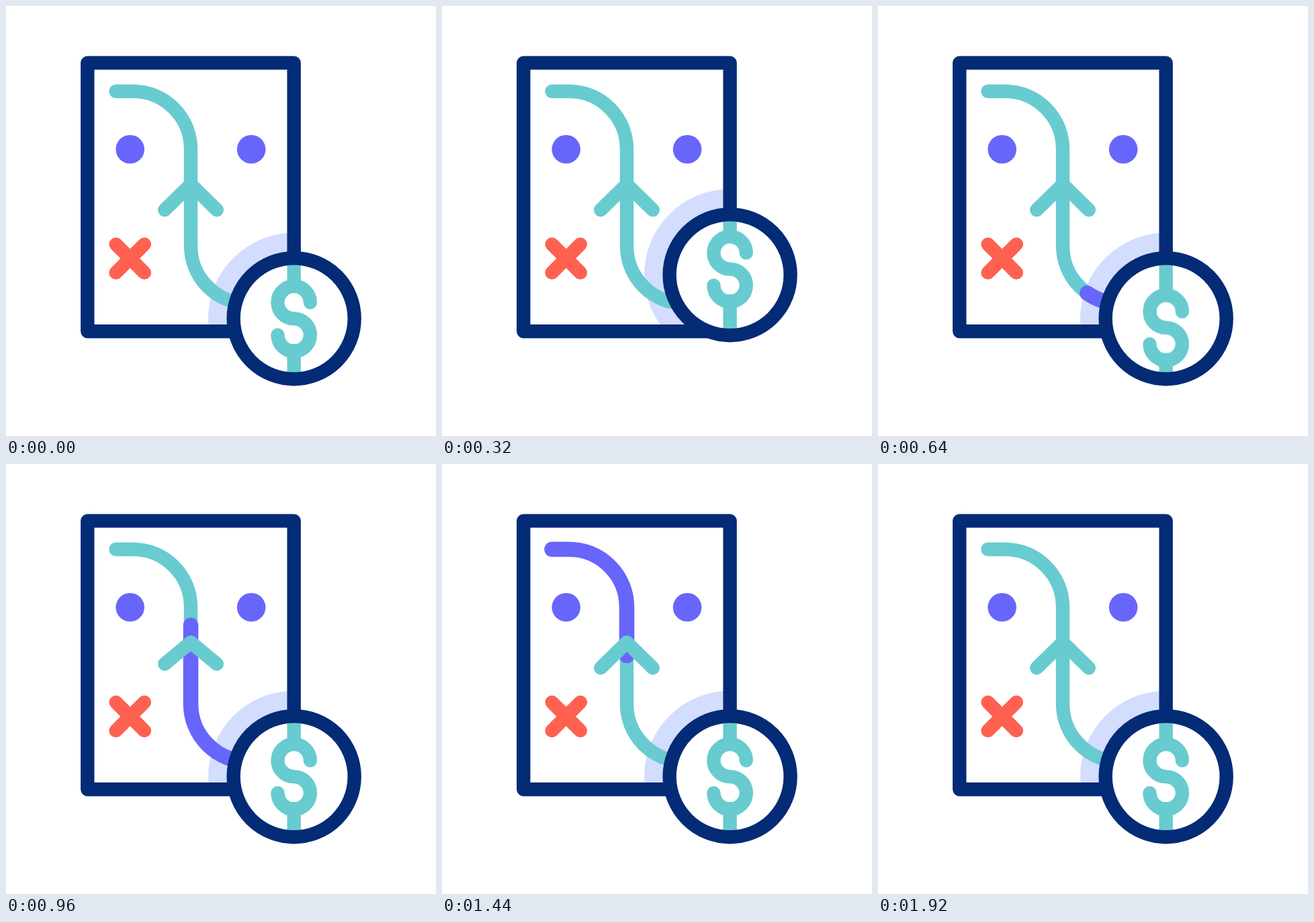
An HTML page for the animation above (2000 ms loop, 640 px wide and 640 px high).

```html
<!DOCTYPE html>
<html lang="en">
<head>
<meta charset="utf-8">
<title>Strategy map</title>
<style>
  @property --head { syntax: "<number>"; inherits: false; initial-value: 0; }
  @property --tail { syntax: "<number>"; inherits: false; initial-value: 0; }

  :root {
    --t: 0;
    --navy: #032b76;
    --teal: #68cbd0;
    --violet: #6866fa;
    --coral: #ff6150;
    --pale: #d3ddfd;
    --ease: cubic-bezier(.37, 0, .63, 1);
  }
  html, body { margin: 0; width: 100%; height: 100%; overflow: hidden; background: #fff; }
  svg { display: block; width: 100%; height: 100%; }

  .line { fill: none; stroke-width: 20.4; stroke-linecap: round; stroke-linejoin: round; }
  .navy { stroke: var(--navy); }
  .teal { stroke: var(--teal); }
  .coral { stroke: var(--coral); }

  /* The script scrubs every animation through --t. */
  .coin, .dollar, .arrow, .pulse {
    animation: 2s var(--ease) calc(var(--t) * -1ms) infinite paused;
  }
  .coin { animation-name: jump; }
  .dollar { animation-name: sway; }
  .arrow { animation-name: flap; }
  .pulse {
    animation-name: head, tail;
    stroke: var(--violet);
    stroke-width: 22.6;
    stroke-dasharray: 0 calc(var(--tail) * 1px) calc((var(--head) - var(--tail)) * 1px) 999px;
  }

  @keyframes jump {
    0%, 4%, 30%, 100% { transform: translateY(0); }
    16%, 18% { transform: translateY(-65px); }
  }
  @keyframes sway {
    0%, 4% { transform: translateY(0); }
    17% { transform: translateY(-9px); }
    32% { transform: translateY(13.5px); }
    42%, 100% { transform: translateY(0); }
  }
  @keyframes flap {
    0%, 45%, 60%, 100% { d: path("M236.2 303.6L275 265.4L313.8 303.6"); }
    48% { d: path("M236.2 297.6L275 265.4L313.8 297.6"); }
    52.5% { d: path("M219 276L275 265.4L331 276"); }
  }
  @keyframes head {
    0%, 17% { --head: 0; }
    72.2%, 91.99% { --head: 466; }
    92%, 100% { --head: 0; }
  }
  @keyframes tail {
    0%, 52% { --tail: 0; }
    91.99% { --tail: 466; }
    92%, 100% { --tail: 0; }
  }
</style>
</head>
<body>
<svg viewBox="0 0 640 640">
  <defs>
    <clipPath id="sheet"><rect x="121.3" y="84.6" width="307.3" height="399.6"/></clipPath>
    <clipPath id="face"><circle cx="428.6" cy="465.2" r="88"/></clipPath>
    <path id="route" pathLength="466" d="M387 443H361A86 86 0 0 1 275 357V213A86 86 0 0 0 189 127H163.5"/>
  </defs>

  <g clip-path="url(#sheet)">
    <circle class="coin" cx="428.6" cy="465.2" r="127.6" fill="var(--pale)"/>
  </g>
  <rect class="line navy" x="121.3" y="84.6" width="307.3" height="399.6"/>

  <g fill="var(--violet)">
    <circle cx="184.7" cy="213.3" r="21.3"/>
    <circle cx="365.1" cy="213.3" r="21.3"/>
  </g>
  <path class="line coral" d="M163.6 354.6l42.3 42.3m0-42.3l-42.3 42.3"/>

  <use class="line teal" href="#route"/>
  <path class="line pulse" pathLength="466" d="M387 443H361A86 86 0 0 1 275 357V213A86 86 0 0 0 189 127H163.5"/>
  <path class="line teal arrow" d="M236.2 303.6L275 265.4L313.8 303.6"/>

  <g class="coin">
    <circle cx="428.6" cy="465.2" r="90" fill="#fff"/>
    <g clip-path="url(#face)">
      <path class="line teal dollar" d="M428.6 340V417M428.6 513V590M452.8 441.2A24.2 24.2 0 1 0 428.6 465.4A24.2 24.2 0 1 1 404.4 489.6"/>
    </g>
    <circle class="line navy" cx="428.6" cy="465.2" r="90"/>
  </g>
</svg>
<script>
  const LOOP = 2000, STEP = 40;
  const start = performance.now();

  function draw() {
    const t = Math.max(0, performance.now() - start) % LOOP;
    document.documentElement.style.setProperty("--t", Math.floor(t / STEP) * STEP);
    requestAnimationFrame(draw);
  }
  draw();
</script>
</body>
</html>
```
